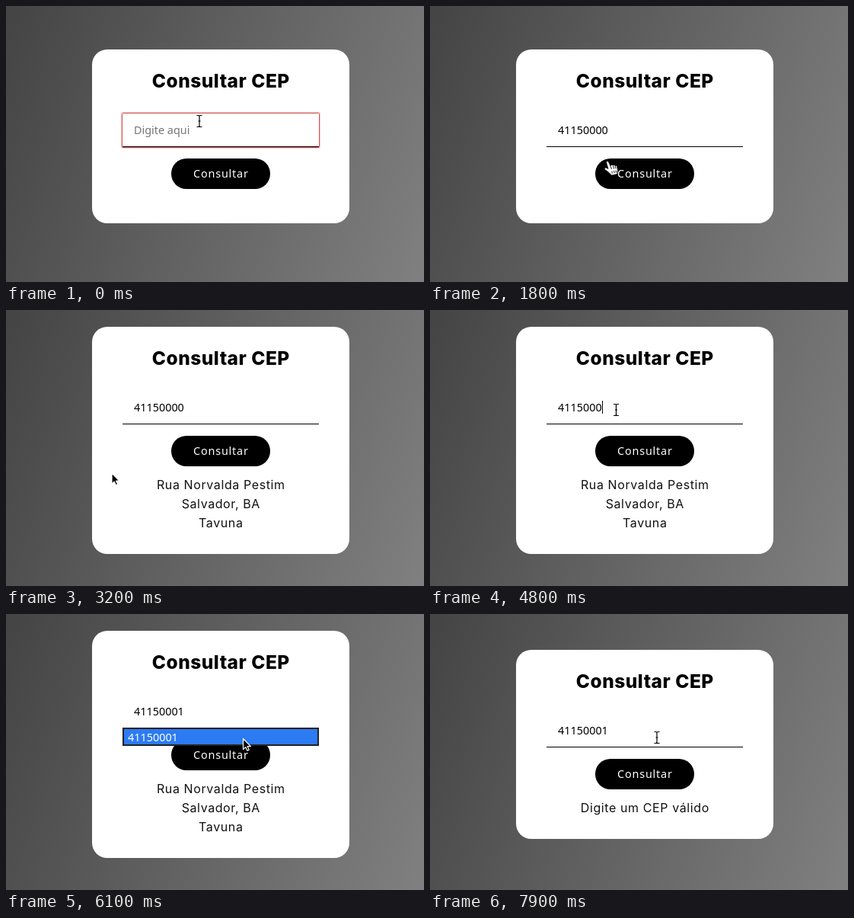
Write an HTML page that moves like this. It is 549x362 px and loops after 8 s.

```html
<!DOCTYPE html>
<html lang="pt-BR">
<head>
<meta charset="utf-8">
<title>Consultar CEP</title>
<style>
  html, body { margin: 0; width: 100%; height: 100%; overflow: hidden; }
  body { background: linear-gradient(110deg, #444 0%, #808080 100%); }
  svg { display: block; width: 549px; height: 362px; }
  text { font: 14.4px "Noto Sans", "Open Sans", sans-serif; white-space: pre; }
  .mid { text-anchor: middle; }
  .title { font: 800 24.5px Inter, sans-serif; letter-spacing: .5px; }
  .result { font: 16px Inter, sans-serif; letter-spacing: .6px; fill: #111; }
  .label { fill: #fff; letter-spacing: .8px; }
  .row { fill: #fff; }
</style>
</head>
<body>
<svg viewBox="0 0 549 362">
  <rect id="card" x="113" width="338" rx="20" fill="#fff"/>
  <g id="form">
    <text class="title mid" x="282.3" y="50">Consultar CEP</text>
    <g id="ring" fill="none">
      <rect x="151.5" y="82.5" width="261" height="47" rx="2" stroke="#f6c9c4"/>
      <rect x="152.5" y="83.5" width="259" height="45" rx="1" stroke="#cf5656"/>
    </g>
    <text id="value" x="168" y="111"></text>
    <rect id="caret" y="97" width="1" height="17"/>
    <rect x="153" y="127" width="258" height="1"/>
    <rect id="button" x="217" y="143" width="130" height="40" rx="20"/>
    <rect id="hover" x="219" y="145" width="126" height="36" rx="18" fill="#141414"/>
    <text class="label mid" x="282.4" y="168">Consultar</text>
    <g id="results"></g>
    <g id="menu"></g>
  </g>
  <g id="arrow">
    <path d="M.5.5V14.6L3.7 11.6 5.9 16.2 8.2 15.1 6.1 10.7H10.4Z" stroke="#fff" stroke-width="1.2" stroke-linejoin="round"/>
  </g>
  <g id="beam" fill="none">
    <path d="M-3.5-7.5h2q1.5 0 1.5 1.8V5.7q0 1.8-1.5 1.8h-2M3.5-7.5h-2Q0-7.5 0-5.7M3.5 7.5h-2Q0 7.5 0 5.7M-1.5 0h3" stroke="#000" stroke-width="1.2"/>
  </g>
  <g id="hand">
    <path d="M-1.4 1Q-.4-1.4 1.4.3L4 6 5 4.6Q6.4 3.6 7.4 5 8.8 3.8 10 5.4 11.8 4.6 12.6 6.4L13.6 11.4 13 16.4 5.6 18 1.4 14 -3.6 10.2Q-4.2 8 -2 8L1 9.6Z" fill="#fff" stroke="#000" stroke-width=".7" stroke-linejoin="round"/>
    <path d="M4.2 6.2L5.5 10M7.4 5.4L8.6 9.6M10.2 5.8L11.2 9.4M5.8 12.6l.6 3M8.6 12l.6 3M11.2 11.6l.4 3" fill="none" stroke="#000" stroke-width=".9"/>
  </g>
</svg>
<script>
const LOOP = 8000, TICK = 100;
const $ = id => document.getElementById(id);

const EMPTY = { top: 57, height: 228, lines: [] };
const FOUND = { top: 22, height: 298, lines: ["Rua Norvalda Pestim", "Salvador, BA", "Tavuna"] };
const ERROR = { top: 47, height: 248, lines: ["Digite um CEP válido"] };
const HISTORY = ["41150000", "41.150-000", "1231231", "41150", "41150001"];
const OLD = HISTORY[0], NEW = HISTORY[4];

// Each step changes only the listed properties.
const STEPS = [
  [0, { card: EMPTY, value: "", caret: -1, rows: [], pick: -1, ring: true }],
  [300, { ring: false, caret: 0, rows: HISTORY }],
  [1100, { value: OLD, caret: -1, pick: 0 }],
  [1500, { rows: [], pick: -1 }],
  [2100, { card: FOUND }],
  [4100, { caret: 8 }],
  [4800, { value: "4115000", caret: 7 }],
  [4900, { rows: [OLD, NEW] }],
  [5100, { value: NEW, caret: 8 }],
  [5200, { rows: [NEW] }],
  [5600, { caret: -1, pick: 0 }],
  [6200, { rows: [], pick: -1 }],
  [6300, { caret: 8 }],
  [7100, { card: ERROR, caret: -1 }]
];

// Pointer path: time, shape, x, y
const PATH = [
  [0, "beam", 254, 151], [300, "", 253, 151],
  [600, "arrow", 253, 151], [700, "arrow", 253, 151], [900, "arrow", 220, 178],
  [1000, "arrow", 220, 178], [1100, "arrow", 221, 186], [1500, "arrow", 225, 192],
  [1700, "arrow", 225, 192], [1800, "hand", 233, 204], [1900, "hand", 236, 208],
  [2000, "hand", 236, 208], [2100, "arrow", 234, 212], [2200, "arrow", 222, 240],
  [2400, "arrow", 165, 320], [2600, "arrow", 139, 213], [3100, "arrow", 139, 213],
  [3200, "arrow", 138.5, 213.5], [3500, "arrow", 192, 170], [3700, "beam", 235, 134],
  [3800, "beam", 242, 128], [4000, "beam", 242, 128], [4100, "beam", 244.5, 131],
  [5300, "beam", 244.5, 131], [5400, "beam", 250, 138], [5600, "arrow", 274, 155],
  [5900, "arrow", 304, 167], [6100, "arrow", 311, 163], [6200, "hand", 312, 169],
  [6600, "hand", 312, 174], [6700, "hand", 312, 174], [6900, "hand", 307, 167],
  [7000, "hand", 307, 167], [7100, "arrow", 310, 170], [7400, "arrow", 326, 178],
  [7600, "arrow", 326, 178], [7700, "arrow", 316, 172], [7800, "beam", 304, 165],
  [7900, "beam", 298, 162]
];

// Button hover spans: start, end
const HOVERS = [[1800, 2100], [6200, 7100]];

function stateAt(t) {
  return Object.assign({}, ...STEPS.filter(s => s[0] <= t).map(s => s[1]));
}

function pointerAt(t) {
  const i = PATH.findLastIndex(p => p[0] <= t);
  const [t0, shape, x0, y0] = PATH[i];
  const [t1, , x1, y1] = PATH[i + 1] || [LOOP, "", x0, y0];
  const k = (t - t0) / (t1 - t0);
  return { shape, x: x0 + (x1 - x0) * k, y: y0 + (y1 - y0) * k };
}

function hoverAt(t) {
  const span = HOVERS.find(([a, b]) => t >= a && t < b);
  return span ? Math.min(1, (t - span[0]) / 400) : 0;
}

function set(id, attrs) {
  for (const name in attrs) $(id).setAttribute(name, attrs[name]);
}

const show = (id, on) => set(id, { display: on ? "inline" : "none" });

function menuMarkup(rows, pick) {
  if (!rows.length) return "";
  const box = `<rect x="153" y="127" width="258" height="${rows.length * 20 + 4}" fill="#222224"/>`;
  return box + rows.map((row, i) => {
    const y = 129 + i * 20;
    const mark = i === pick ? `<rect x="155" y="${y}" width="254" height="20" fill="#2c7bf2"/>` : "";
    return `${mark}<text class="row" x="160" y="${y + 16}">${row}</text>`;
  }).join("");
}

function draw(t) {
  const s = stateAt(t), p = pointerAt(t);
  set("card", { y: s.card.top, height: s.card.height });
  set("form", { transform: `translate(0 ${s.card.top})` });
  show("ring", s.ring);

  $("value").textContent = s.value || "Digite aqui";
  set("value", { fill: s.value ? "#000" : "#757575", "font-weight": 400 });
  $("value").style.fontWeight = s.value ? 500 : 400;
  show("caret", s.caret >= 0);
  set("caret", { x: Math.round(168 + s.caret * 8.3) });
  set("hover", { opacity: hoverAt(t) });

  $("results").innerHTML = s.card.lines.map((line, i) =>
    `<text class="result mid" x="282.3" y="${213 + i * 25}">${line}</text>`).join("");
  $("menu").innerHTML = menuMarkup(s.rows, s.pick);

  for (const id of ["arrow", "beam", "hand"]) show(id, id === p.shape);
  if (p.shape) set(p.shape, { transform: `translate(${p.x} ${p.y})` });
}

const start = performance.now();
let last = -1;
function frame() {
  const t = (performance.now() - start) % LOOP;
  const tick = Math.floor(t / TICK) * TICK;
  if (tick !== last) draw(last = tick);
  requestAnimationFrame(frame);
}
frame();
</script>
</body>
</html>
```
